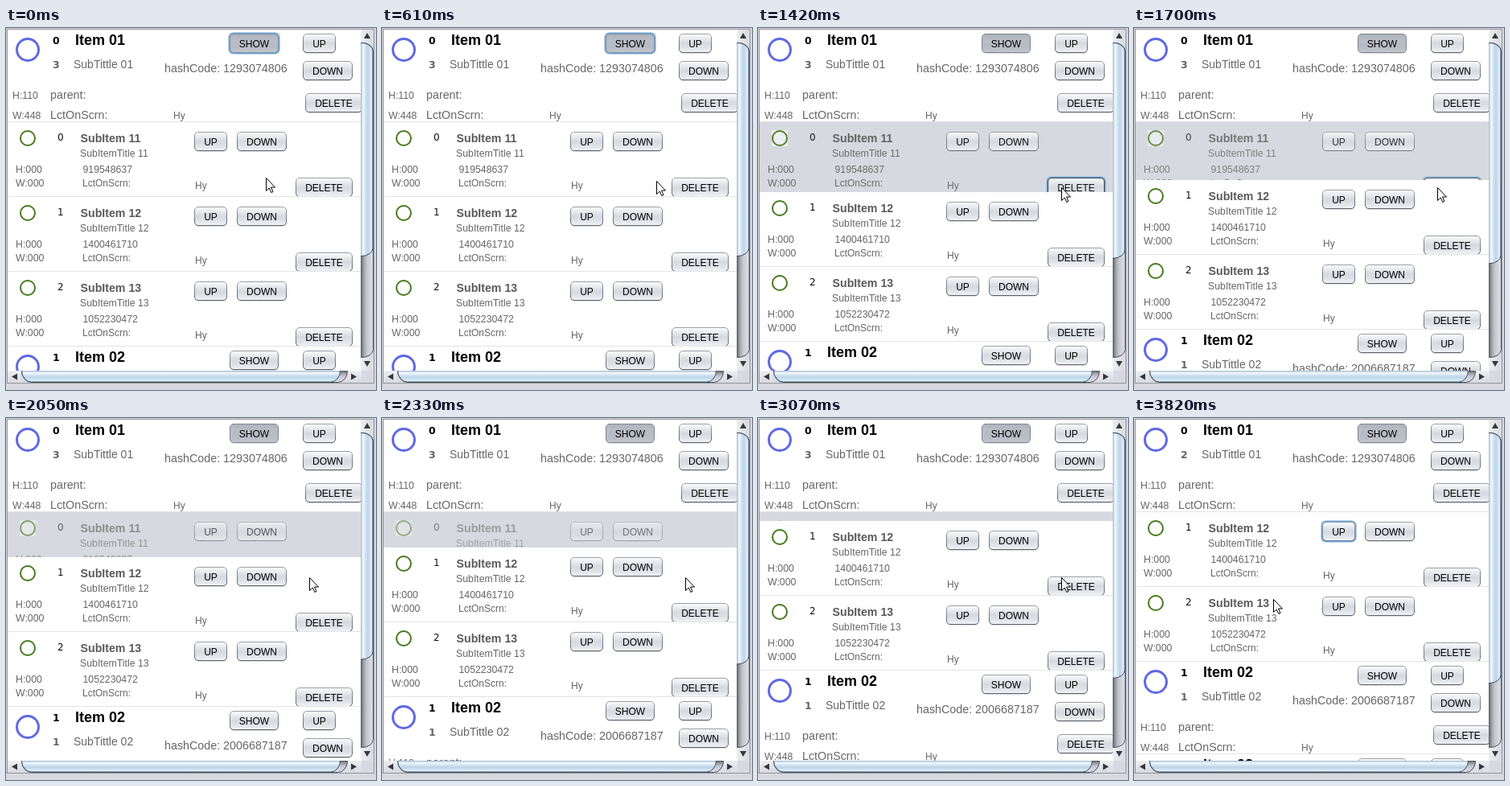
An HTML page that plays this animation: 460x450 px, repeating every 4630 ms.

```html
<!DOCTYPE html>
<html lang="en">
<head>
<meta charset="utf-8">
<title>Collapsing list</title>
<style>
@property --s { syntax: "<integer>"; inherits: true; initial-value: 0; }
html, body { margin: 0; width: 100%; height: 100%; overflow: hidden; background: #d6d9df; }
#stage { display: block; width: 460px; height: 450px; --s: 0; animation: slide 4630ms infinite; }
text { font-family: "Liberation Sans", Arial, sans-serif; font-size: 12px; fill: #666; white-space: pre; }
.btn { fill: #000; text-anchor: middle; }
.title { font-size: 18px; font-weight: bold; fill: #000; }
.big { font-size: 14.3px; }
.sub { font-size: 14px; }
.name { font-size: 14.2px; font-weight: bold; fill: #5a5a5a; }
.small { font-size: 12.3px; }
.num { font: 12px "DejaVu Sans", sans-serif; fill: #111; }
.idx { font: bold 12.5px "DejaVu Sans", sans-serif; fill: #000; }
.count { font: bold 12.5px "DejaVu Sans", sans-serif; fill: #666; }

/* --s is how many pixels of the removed row are gone */
@keyframes slide {
  0%, 26.349% { --s: 0; animation-timing-function: steps(7); }
  36.717% { --s: 21; animation-timing-function: steps(9); }
  50.323% { --s: 49; animation-timing-function: steps(6); }
  59.179% { --s: 66; animation-timing-function: steps(5); }
  66.306% { --s: 82; animation-timing-function: steps(4); }
  72.57%, 100% { --s: 93; }
}
.rest { transform: translateY(calc(var(--s) * -1px)); }
.gone { opacity: calc(1 - var(--s) / 93); }
.thumb { height: calc(166700px / (629 - var(--s))); }

.hover, .press, .focus, .start, .panel, .early, .late { animation: 4630ms step-end infinite; }
.hover { animation-name: hover; }
.press { animation-name: press; }
.focus { animation-name: focus; }
.start { animation-name: start; }
.panel { animation-name: panel; }
.early { animation-name: early; }
.late { animation-name: late; }
@keyframes hover { 0% { opacity: 0; } 17.667% { opacity: 1; } 26.349% { opacity: 0; } }
@keyframes press { 0% { opacity: 0; } 26.349% { opacity: 1; } 27.861% { opacity: 0; } }
@keyframes focus { 0% { opacity: 0; } 26.349% { opacity: 1; } }
@keyframes start { 0% { opacity: 1; } 26.349% { opacity: 0; } }
@keyframes panel { 0% { opacity: 1; } 27.861% { opacity: 0; } }
@keyframes early { 0% { opacity: 1; } 72.57% { opacity: 0; } }
@keyframes late { 0% { opacity: 0; } 72.57% { opacity: 1; } }

.cursor { animation: move 4630ms step-end infinite; }
@keyframes move {
  0% { transform: translate(323px, 186px); }
  11.447% { transform: translate(323px, 186px); animation-timing-function: steps(5, jump-both); }
  19.222% { transform: translate(377px, 198px); }
  82.505%, 100% { transform: translate(173px, 225px); }
}
</style>
</head>
<body>
<svg id="stage" viewBox="0 0 460 450"></svg>
<script>
const text = (x, y, str, cls = "") => `<text x="${x}" y="${y}" class="${cls}">${str}</text>`;
const rect = (x, y, w, h, fill, more = "") =>
  `<rect x="${x}" y="${y}" width="${w}" height="${h}" fill="${fill}" ${more}/>`;
const group = (cls, body) => `<g class="${cls}">${body}</g>`;
const at = (y, body) => `<g transform="translate(0 ${y})">${body}</g>`;
const ring = (y, r, w, color) =>
  `<circle cx="27" cy="${y}" r="${r}" fill="none" stroke="${color}" stroke-width="${w}"/>`;

const gradient = (id, dir, from, ...stops) => {
  const line = dir === "x" ? `x1="${from}" x2="1" y1="0" y2="0"` : `x1="0" x2="0" y1="${from}" y2="1"`;
  const list = stops.map((c, i) => `<stop offset="${i / (stops.length - 1)}" stop-color="${c}"/>`);
  return `<linearGradient id="${id}" ${line}>${list.join("")}</linearGradient>`;
};

const halo = (x, y, w) =>
  rect(x - .5, y - .5, w + 1, 25, "none", 'rx="5" stroke="#73a4d1" stroke-width="2"');

function button(x, y, w, label, look = "up") {
  const edge = look === "down" ? "#4c5563" : look === "on" ? "#80848d" : "url(#edge)";
  return rect(x + .5, y + 2, w - 1, 23, "#c9ccd3", 'rx="4.5" opacity=".6"') +
    rect(x + .5, y + .5, w - 1, 23, `url(#${look})`, `rx="4.5" stroke="${edge}"`) +
    text(x + w / 2, y + 17, label, "btn");
}

function header(n, count, hash, active) {
  return rect(2, -1, 440, 115, "#fff") +
    ring(24, 13.5, 3, "#5f69e4") +
    text(58, 17, n - 1, "idx") + count +
    text(86, 18, `Item 0${n}`, "title") +
    text(84, 47, `SubTittle 0${n}`, "sub") +
    text(197, 52, `hashCode: ${hash}`, "big") +
    text(8, 85, "H:110", "small") + text(8, 110, "W:448", "small") +
    text(55, 85, "parent:", "big") + text(55, 110, "LctOnScrn:", "big") +
    text(208, 110, "Hy") +
    button(278, 4, 61, "SHOW", active ? "on" : "up") +
    (active ? group("start", halo(278, 4, 61)) : "") +
    button(369, 4, 41, "UP") + button(369, 38, 62, "DOWN") + button(372, 78, 71, "DELETE") +
    rect(2, 113, 440, 1, "#e3e4e6");
}

function row(n, hash) {
  const removed = n === 0;
  const extra = removed
    ? group("hover", button(360, 69, 71, "DELETE", "over")) +
      group("press", button(360, 69, 71, "DELETE", "down")) +
      group("focus", halo(360, 69, 71) + rect(360.5, 69.5, 70, 23, "none", 'rx="4.5" stroke="#26384e"'))
    : n === 1 ? group("late", halo(234, 12, 41)) : "";
  const body = rect(17, 10, 20, 20, "#fff", 'opacity=".6"') +
    ring(20, 9, 2, "#46791c") +
    text(64, 23, n, "num") +
    text(92.5, 25, `SubItem 1${n + 1}`, "name") +
    text(92, 43, `SubItemTitle 1${n + 1}`, "small") +
    text(12, 63, "H:000", "small") + text(12, 80, "W:000", "small") +
    text(95.5, 63, hash, "small") + text(95, 80, "LctOnScrn:") + text(235, 83, "Hy") +
    button(234, 12, 41, "UP") + button(287, 12, 62, "DOWN") + button(360, 69, 71, "DELETE") + extra;
  return group(removed ? "panel" : "", rect(2, 0, 440, 93, "#fff")) +
    group(removed ? "gone" : "", body) +
    group(removed ? "panel" : "", rect(2, 92, 440, 1, "#e3e4e6"));
}

const arrow = (x, y, turn) =>
  `<path d="M-4 3L0-4L4 3Z" fill="#33373d" transform="translate(${x} ${y}) rotate(${turn})"/>`;

// The list covers the inner half of each bar, so only the outer corners look round.
const scrollbars =
  rect(441, 2, 16, 424, "url(#barX)") + rect(2, 426, 440, 15, "url(#barY)") +
  rect(426, 18.5, 30.5, 391, "url(#trackX)", 'rx="14" ry="10" stroke="#4c5058"') +
  rect(19.5, 412, 405, 28.5, "url(#trackY)", 'rx="12" ry="14" stroke="#4c5058"') +
  rect(426, 18.5, 30, 0, "url(#thumbX)", 'rx="14" ry="10" stroke="#3a4f63" class="thumb"') +
  rect(19.5, 412, 396, 28, "url(#thumbY)", 'rx="12" ry="14" stroke="#3a4f63"') +
  arrow(449, 10, 0) + arrow(449, 417, 180) + arrow(11, 433.5, -90) + arrow(432, 433.5, 90);

const track = ["#5f6269", "#a4a7ae", "#c6c9d0", "#d3d6dc", "#dcdfe4"];
const thumb = ["#a3bbd1", "#f4f9fd", "#d3e2f0", "#bdd3e7", "#d2e7f5", "#e2f4fc"];
const defs =
  gradient("up", "y", 0, "#fdfdfe", "#e8eaee", "#d6d9df", "#dfe2e7", "#f3f4f7") +
  gradient("over", "y", 0, "#ffffff", "#f2f4f7", "#e3e6eb", "#ebeef2", "#fbfcfd") +
  gradient("on", "y", 0, "#aeb2bb", "#b9bdc6", "#b6bac3", "#c3c7cf") +
  gradient("down", "y", 0, "#98a0ad", "#abb1bc", "#a9afba", "#c0c6d0") +
  gradient("edge", "y", 0, "#9a9da4", "#5d6068") +
  gradient("barX", "x", 0, "#eceef1", "#d6d9df") + gradient("barY", "y", 0, "#eceef1", "#d6d9df") +
  gradient("trackX", "x", .5, ...track) + gradient("trackY", "y", .5, ...track) +
  gradient("thumbX", "x", .5, ...thumb) + gradient("thumbY", "y", .5, ...thumb);

const firstCount = group("early", text(58, 47, 3, "count")) + group("late", text(58, 47, 2, "count"));
const list = at(117, row(0, "919548637")) +
  group("rest",
    at(210, row(1, "1400461710")) + at(303, row(2, "1052230472")) +
    at(397, header(2, text(58, 47, 1, "count"), "2006687187")) +
    at(512, header(3, text(58, 47, 1, "count"), "1735600054"))) +
  at(3, header(1, firstCount, "1293074806", true));

document.getElementById("stage").innerHTML =
  `<defs>${defs}</defs>` + rect(0, 0, 460, 450, "#d6d9df") + scrollbars +
  `<svg x="2" y="2" width="439" height="424" viewBox="2 2 439 424">` +
  rect(2, 2, 440, 424, "#d6d9df") + list + `</svg>` +
  rect(1.5, 1.5, 456, 440, "none", 'stroke="#92959d"') +
  rect(442, 427, 15, 14, "#d6d9df") +
  `<circle class="press" cx="377" cy="198" r="12" fill="#e8dc30" fill-opacity=".7"/>` +
  group("cursor", `<path d="M.5.5V16.5L4.2 13L6.8 18.5L9 17.5L6.5 12H11.5Z"
    fill="#fff" stroke="#000" stroke-linejoin="round"/>`);
</script>
</body>
</html>
```
